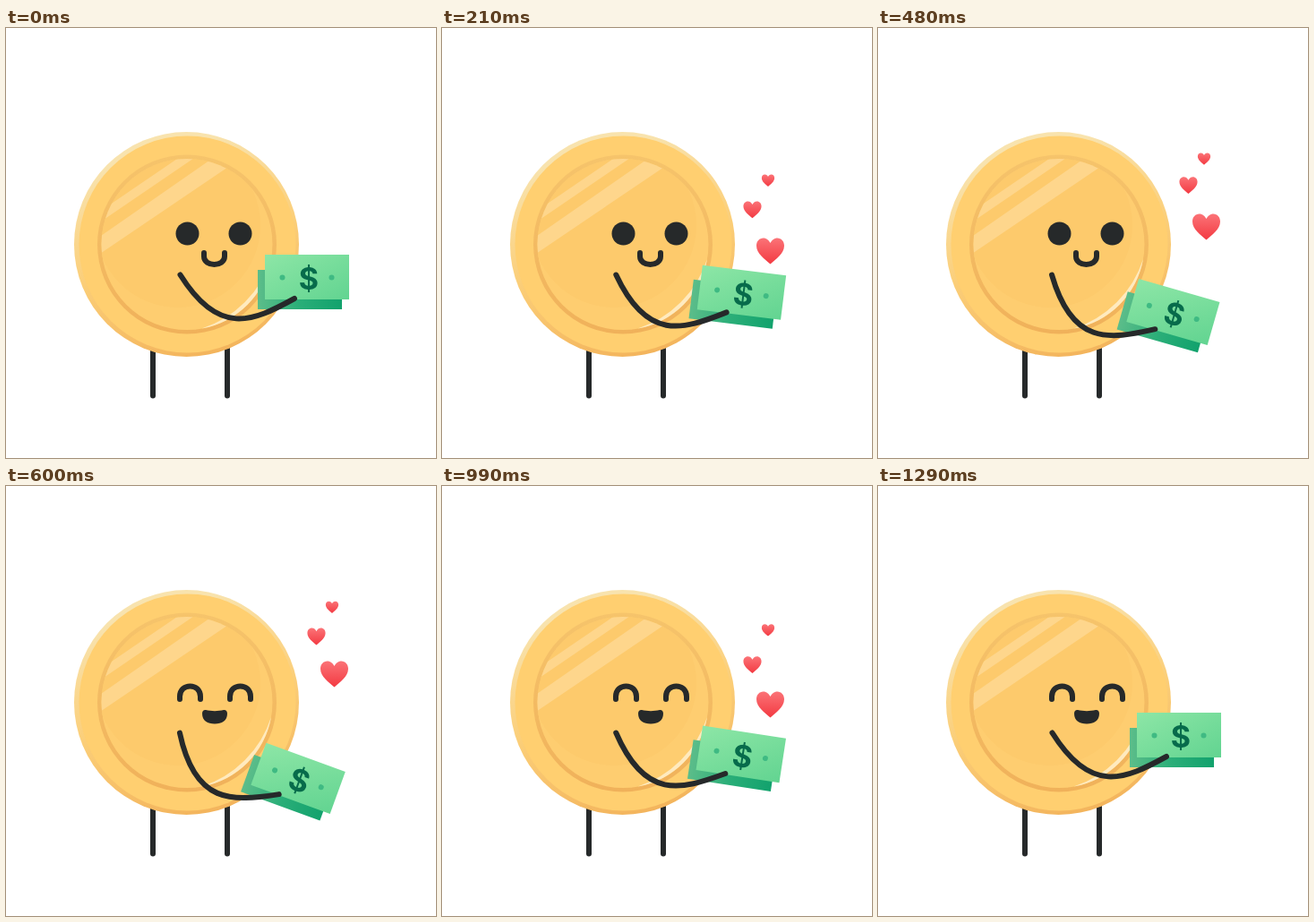
Recreate the animation shown at these times as an HTML page. Size 480 by 480 pixels, loop 1380 ms.

```html
<!DOCTYPE html>
<html lang="en">
<head>
<meta charset="utf-8">
<title>Happy coin</title>
<style>
  html, body { margin: 0; height: 100%; overflow: hidden; background: #fff; }
  svg { display: block; width: 100vw; height: 100vh; }
  .ink { fill: #26292a; }
  .line { fill: none; stroke: #26292a; stroke-width: 6; stroke-linecap: round; stroke-linejoin: round; }
  .dollar { font: 700 34px Inter, Arial, sans-serif; text-anchor: middle; fill: #076b4b; }
</style>
</head>
<body>
<svg viewBox="0 0 480 480">
  <defs>
    <linearGradient id="rim" x1=".3" y1="0" x2=".6" y2="1">
      <stop offset=".1" stop-color="#f8e3ae"/>
      <stop offset=".55" stop-color="#fbce78"/>
      <stop offset="1" stop-color="#f3b45c"/>
    </linearGradient>
    <linearGradient id="groove" x1="0" y1="0" x2="0" y2="1">
      <stop offset="0" stop-color="#f6c46b"/>
      <stop offset="1" stop-color="#f0b15a"/>
    </linearGradient>
    <linearGradient id="frontBill" x1="0" y1="0" x2="1" y2="1">
      <stop offset="0" stop-color="#8de6a6"/>
      <stop offset="1" stop-color="#62d491"/>
    </linearGradient>
    <linearGradient id="backBill">
      <stop offset="0" stop-color="#5cbd8a"/>
      <stop offset=".5" stop-color="#2aae78"/>
      <stop offset="1" stop-color="#12a26d"/>
    </linearGradient>
    <linearGradient id="red" x1="0" y1="0" x2="0" y2="1">
      <stop offset="0" stop-color="#fb7377"/>
      <stop offset="1" stop-color="#f33a42"/>
    </linearGradient>
    <clipPath id="inner"><circle cx="202" cy="241.5" r="95.5"/></clipPath>
    <path id="heart" fill="url(#red)" d="M0 14.5C-6 9-15.5 3-15.5-6C-15.5-11-12-14.5-8-14.5C-4-14.5-1.5-12 0-9C1.5-12 4-14.5 8-14.5C12-14.5 15.5-11 15.5-6C15.5 3 6 9 0 14.5z"/>
  </defs>

  <path class="line" d="M164 350V410.500M247 350V410.500"/>

  <circle cx="201.500" cy="241.500" r="125.500" fill="url(#rim)"/>
  <circle cx="202.500" cy="241.500" r="121" fill="#ffcf70"/>
  <circle cx="202" cy="241.500" r="100" fill="url(#groove)"/>
  <g clip-path="url(#inner)">
    <circle cx="202" cy="241.500" r="96" fill="#fecd70"/>
    <circle cx="192" cy="220" r="92" fill="#fdca6c"/>
    <path fill="#fff" fill-opacity=".22" d="M90 215L260 99V111L90 227zM90 243L260 125V147L90 262z"/>
  </g>
  <path fill="#fff0cd" fill-opacity=".85" d="M218.600 335.500A95.500 95.500 0 0 0 296 258A120 120 0 0 1 218.600 335.500z"/>

  <g id="calm">
    <circle class="ink" cx="202.500" cy="229.500" r="13"/>
    <circle class="ink" cx="261.500" cy="229.500" r="13"/>
    <path class="line" d="M221 251v4c0 12 23 12 23 0v-4"/>
  </g>
  <g id="joy">
    <path class="line" d="M194 238v-3c0-15.500 23-15.500 23 0v3M250 238v-3c0-15.500 23-15.500 23 0v3"/>
    <path class="ink" d="M219 254c0-3 2-4.500 4-4 6 1.500 14 1.500 20 0 2-.5 4 1 4 4 0 8-6 11.500-14 11.500s-14-3.500-14-11.500z"/>
  </g>

  <g id="hearts">
    <use href="#heart"/>
    <use href="#heart"/>
    <use href="#heart"/>
  </g>

  <g id="arm">
    <rect x="281" y="270" width="94" height="44" fill="url(#backBill)"/>
    <rect x="289" y="253" width="94" height="50" fill="url(#frontBill)"/>
    <g fill="#3fba83">
      <circle cx="308.500" cy="278.500" r="3"/>
      <circle cx="363.500" cy="278.500" r="3"/>
    </g>
    <text class="dollar" x="338" y="292">$</text>
    <path class="line" d="M194.500 275.500C237.800 344.800 275.300 327.700 322 302"/>
  </g>
</svg>
<script>
  const LOOP = 1380, STEP = 30, END = 1290, SMILE_AT = 570, FADE = 150;
  const $ = id => document.getElementById(id);

  // x, scale, resting y, top y, time of the top
  const hearts = [
    [366.5, 1, 270, 210, 600],
    [346.5, .65, 224, 166, 575],
    [364, .46, 189, 130, 660],
  ];

  // Linear 0 -> 1 -> 0, highest at `peak`
  const swing = (t, peak) => t < peak ? t / peak : (END - t) / (END - peak);

  function draw(now) {
    const t = Math.min(END, Math.floor(now % LOOP / STEP) * STEP);
    $('arm').setAttribute('transform', `rotate(${20 * swing(t, 600)} 194 274)`);

    const happy = t >= SMILE_AT;
    $('calm').style.display = happy ? 'none' : '';
    $('joy').style.display = happy ? '' : 'none';

    $('hearts').style.opacity = Math.min(1, t / FADE, (END - t) / FADE);
    hearts.forEach(([x, size, low, high, peak], i) => {
      const y = low + (high - low) * swing(t, peak);
      $('hearts').children[i].setAttribute('transform', `translate(${x} ${y}) scale(${size})`);
    });
  }

  const start = performance.now();
  function tick() {
    draw(performance.now() - start);
    requestAnimationFrame(tick);
  }
  tick();
</script>
</body>
</html>
```
